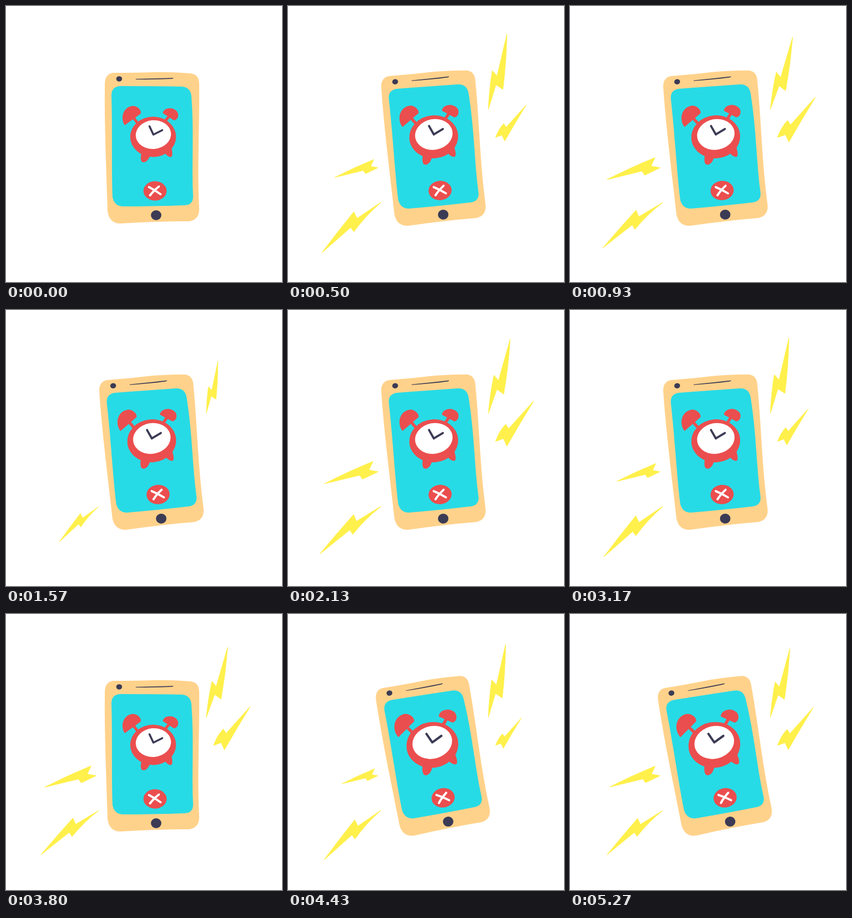
Recreate the animation shown at these times as an HTML page. Size 500 px wide and 500 px high, loop 5330 ms.

```html
<!DOCTYPE html>
<html lang="en">
<head>
<meta charset="utf-8">
<title>Ringing alarm</title>
<style>
  html, body { margin: 0; width: 100%; height: 100%; overflow: hidden; background: #fff; }
  svg { display: block; width: 100%; height: 100%; }
</style>
</head>
<body>
<svg viewBox="0 0 500 500">
  <g id="phone">
    <path fill="#ffd28b" d="M195 121 Q235 121 265 120 T333 122 Q350 123 350 142 C351 220 346 290 350 368 Q350 387 332 390 Q270 390 208 394 Q187 394 184 372 C182 300 178 220 179 140 Q180 122 195 121 Z"/>
    <path fill="#27dbe6" d="M207 145 Q260 145 318 146 Q335 147 336 165 C341 230 336 290 339 345 Q339 360 324 361 Q265 363 211 363 Q196 362 193 346 C191 290 193 220 191 162 Q191 146 207 145 Z"/>
    <g fill="#3b3b55">
      <ellipse cx="205" cy="132" rx="5.3" ry="4.8"/>
      <ellipse cx="272" cy="379" rx="9.5" ry="9"/>
      <path d="M235 132 Q270 131.500 303 130.300 Q304 131.500 300 132 Q270 133.500 235 133 Z"/>
    </g>
    <ellipse cx="270" cy="335" rx="21" ry="17.500" fill="#eb4e4e"/>
    <path fill="none" stroke="#fff" stroke-width="4" stroke-linecap="round" d="M259 328 Q269 333 280 341 M277 327 Q267 335 261 343"/>
    <g id="clock">
      <g fill="#eb4e4e">
        <path d="M215 216 C206 202 213 182 230 181 C239 181 246 190 244 195 Z"/>
        <path d="M284 194 C285 184 304 181 311 193 C314 201 309 207 304 207 Z"/>
        <path d="M246 265 C243 275 243 284 250 283 C256 282 259 276 262 269 Z"/>
        <path d="M286 264 C291 271 296 275 300 273 C303 268 300 260 299 252 Z"/>
        <path fill="none" stroke="#eb4e4e" stroke-width="5" d="M230 201 L239 213 M296 199 L288 209"/>
        <ellipse cx="266.500" cy="237" rx="41.500" ry="36.500"/>
      </g>
      <ellipse cx="267" cy="233" rx="32" ry="26" fill="#fff" transform="rotate(-5 267 233)"/>
      <path fill="none" stroke="#3b3b55" stroke-width="3.600" stroke-linecap="round" stroke-linejoin="round" d="M260 218 L267 233 L283 225"/>
    </g>
  </g>
  <g id="bolts" fill="#fff04b" stroke="#fff04b" stroke-linejoin="round"></g>
</svg>
<script>
const LOOP = 5330, CYCLE = 19, FULL = 9;

// Each bolt grows from its root, the first point of its path.
const bolts = [
  { root: [363, 187], delay: 0, swing: 2.4, path: 'M363 187 Q367 150 374 119 L382 129 L404 55 Q400 105 391 153 L379 144 Z' },
  { root: [376, 238], delay: 3, swing: 0, path: 'M376 238 Q383 219 394 208 L399 216 L443 167 Q419 206 396 246 L390 233 Z' },
  { root: [163, 293], delay: 3, swing: 0, path: 'M163 293 L136 306 L131 299 L69 314 Q110 293 154 275 L147 290 Z' },
  { root: [168, 356], delay: 0, swing: 2.4, path: 'M168 356 Q140 377 117 405 L112 397 L58 439 Q87 405 119 370 L124 382 Z' }
];

const phone = document.getElementById('phone');
const clock = document.getElementById('clock');
const layer = document.getElementById('bolts');
for (const bolt of bolts) {
  bolt.node = document.createElementNS('http://www.w3.org/2000/svg', 'path');
  bolt.node.setAttribute('d', bolt.path);
  layer.append(bolt.node);
}

// Fast ease-out past full size, then a slow retreat.
function boltSize(age) {
  if (age <= 0) return 0;
  return age < FULL
    ? 1.03 * (1 - (1 - age / FULL) ** 2.8)
    : 1.03 - 0.0105 * (age - FULL);
}

function placeBolt({ node, root: [x, y], delay, swing }, step) {
  const size = boltSize(step - delay);
  const angle = swing * (Math.cos((step - 14) * Math.PI / 11) - 1);
  node.setAttribute('visibility', size ? 'visible' : 'hidden');
  node.setAttribute('transform', `translate(${x} ${y}) rotate(${angle}) scale(${size}) translate(${-x} ${-y})`);
}

function render(time) {
  // Poses last 70 ms, shown on a 30 fps clock.
  const tick = Math.floor((time % LOOP + 4) * 0.03);
  const pose = Math.max(0, Math.ceil(tick * 10 / 21) - 1);
  const step = pose % CYCLE;

  // Five shakes per cycle, each drawn in four poses.
  const quarter = Math.floor(step * 20 / CYCLE);
  const shake = (1 - Math.cos(quarter * Math.PI / 2)) / 2;
  phone.setAttribute('transform', `rotate(${-9.4 * shake} 263 267)`);
  clock.setAttribute('transform', `translate(267 234) scale(${1 + 0.135 * shake}) translate(-267 -234)`);
  for (const bolt of bolts) placeBolt(bolt, step);
}

const start = performance.now();
function loop() {
  render(performance.now() - start);
  requestAnimationFrame(loop);
}
loop();
</script>
</body>
</html>
```
